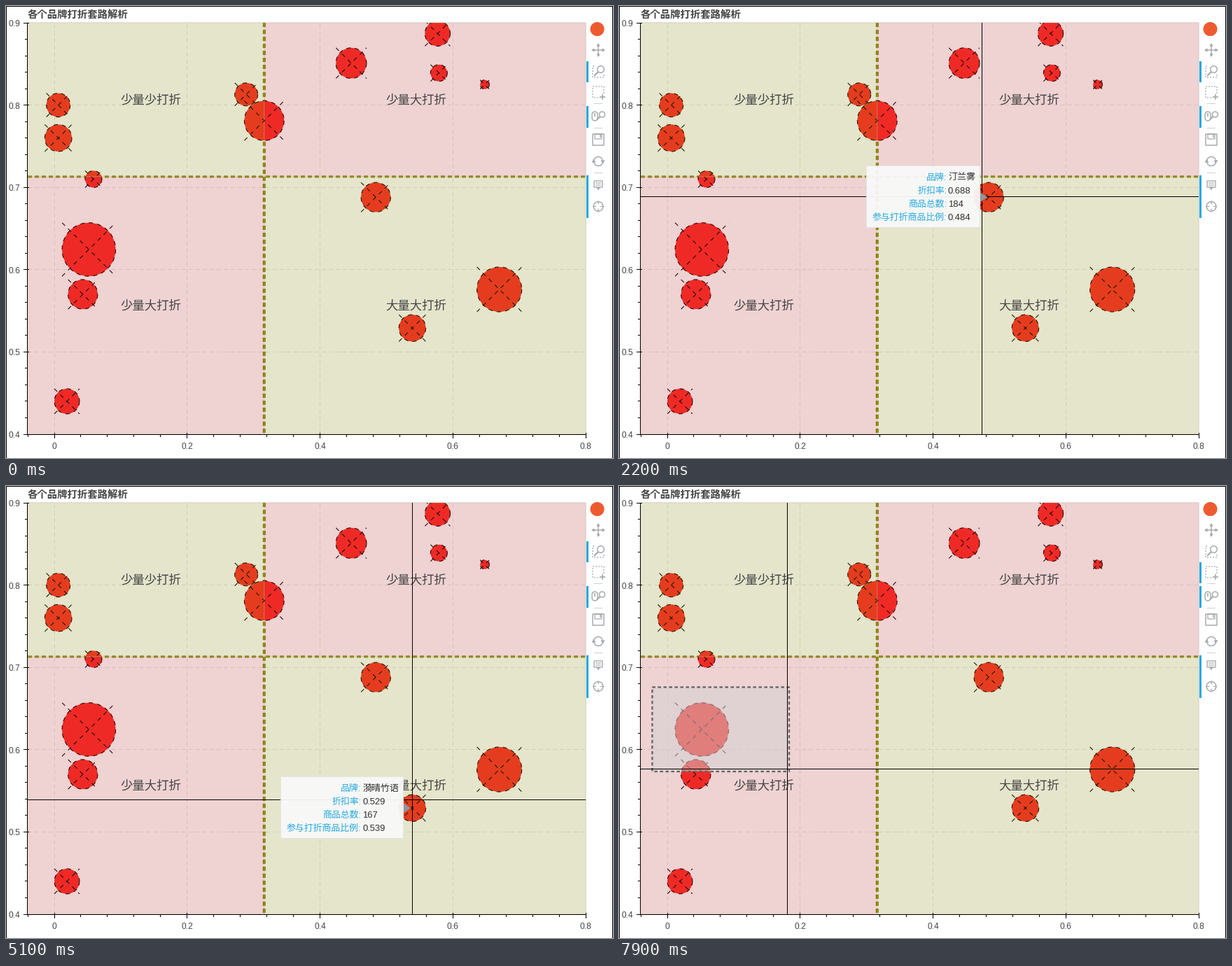
A matplotlib script that plays this animation: 867x646 px, repeating every 8000 ms.

```python
import numpy as np
import matplotlib.pyplot as plt
from matplotlib.animation import FuncAnimation
from matplotlib.patches import Circle, Polygon, Rectangle, RegularPolygon

plt.rcParams["path.snap"] = False

W, H = 867, 646
PT = 0.72  # points per pixel at 100 dpi
LEFT, TOP, RIGHT, BOTTOM = 31, 24, 828, 612
SPLIT_X, SPLIT_Y = 0.316, 0.713
BLUE, ICON, INK = "#26aae1", "#a1a6a9", "#444444"
SANS = ["Liberation Sans", "Noto Sans CJK JP"]
CJK = ["Noto Sans CJK JP"]

# share of goods on sale, discount rate, number of goods
BRANDS = [
    (0.006, 0.800, 148), (0.006, 0.760, 168), (0.059, 0.710, 104),
    (0.052, 0.6245, 333), (0.043, 0.570, 184), (0.019, 0.440, 156),
    (0.289, 0.813, 143), (0.316, 0.781, 247), (0.447, 0.851, 190),
    (0.577, 0.887, 157), (0.579, 0.839, 104), (0.648, 0.825, 57),
    (0.484, 0.688, 184), (0.670, 0.576, 279), (0.539, 0.529, 167),
]
NAMES = {3: "露芷坊", 12: "汀兰雾", 13: "禾露笺", 14: "漪晴竹语"}

# pointer moves: first frame, last frame, where it ends
ENTRY = (RIGHT, 372)
MOVES = [
    (0, 8, (165, 313)), (10, 17, (492, 259)), (19, 24, (532, 279)),
    (27, 33, (700, 391)), (36, 42, (570, 461)), (50, 58, (812, 150)),
    (66, 75, (47, 287)), (75, 79, (240, 404)),
]
LEAVE, SELECT, ENTER, DRAG = 59, 65, 67, 76


def sx(v):
    return 69 + 948.75 * v


def sy(v):
    return TOP + 1176 * (0.9 - v)


def crisp(v):
    return np.floor(v) + 0.5


def radius(n):
    return 0.1148 * n


def pointer(n):
    pos = np.array(ENTRY, float)
    for first, last, goal in MOVES:
        t = np.clip((n - first) / (last - first), 0, 1)
        pos += (np.array(goal) - pos) * t * t * (3 - 2 * t)
    return crisp(pos + 0.5)


fig = plt.figure(figsize=(8.67, 6.46), dpi=100, facecolor="white")
ax = fig.add_axes([0, 0, 1, 1])
ax.set_xlim(0, W)
ax.set_ylim(H, 0)
ax.axis("off")


def line(xs, ys, color, w=1, dash=None, z=1, **kw):
    style = "-" if dash is None else (0, [d / w for d in dash])
    return ax.plot(xs, ys, color=color, lw=w * PT, ls=style, zorder=z,
                   solid_capstyle="butt", dash_capstyle="butt", **kw)[0]


def hline(y, x0, x1, color, w=1, **kw):
    return line([x0, x1], [y, y], color, w, **kw)


def vline(x, y0, y1, color, w=1, **kw):
    return line([x, x], [y0, y1], color, w, **kw)


def outline(x0, y0, x1, y1, color, w=1, **kw):
    return line([x0, x1, x1, x0, x0], [y0, y0, y1, y1, y0], color, w, **kw)


def rect(x0, y0, x1, y1, color, z=1, edge="none", **kw):
    return ax.add_patch(Rectangle((x0, y0), x1 - x0, y1 - y0, fc=color,
                                  ec=edge, lw=PT, zorder=z, **kw))


def text(x, mid, s, size, color=INK, ha="left", z=5, family=SANS, **kw):
    return ax.text(x, mid + 0.37 * size, s, fontsize=size * PT, color=color,
                   ha=ha, va="baseline", family=family, zorder=z, **kw)


def arc(cx, cy, r, a0=0, a1=360, color=ICON, w=1.4, **kw):
    t = np.radians(np.linspace(a0, a1, 90))
    return line(cx + r * np.cos(t), cy + r * np.sin(t), color, w, **kw)


def triangle(cx, cy, r, turn):
    ax.add_patch(RegularPolygon((cx, cy), 3, radius=r, fc=ICON, ec="none",
                                orientation=np.radians(turn)))


def draw_axes():
    for v in np.arange(0, 0.7, 0.2):
        vline(crisp(sx(v)), BOTTOM, TOP, "#e5e5e5", dash=(6, 4))
    for v in np.arange(0.5, 0.85, 0.1):
        hline(crisp(sy(v)), LEFT, RIGHT, "#e5e5e5", dash=(6, 4))
    for i in range(26):
        v, major = 0.4 + 0.02 * i, i % 5 == 0
        hline(crisp(sy(v)), LEFT - (6 if major else 4),
              LEFT + (2 if major else 0), "black", z=6)
        if major:
            text(20, sy(v) + 0.5, f"{v:.1f}", 12, ha="right")
    for i in range(-1, 21):
        v, major = 0.04 * i, i % 5 == 0
        vline(crisp(sx(v)), BOTTOM - (2 if major else 0),
              BOTTOM + (6 if major else 4), "black", z=6)
        if major:
            text(sx(v), 628.5, f"{v:g}", 12, ha="center")
    hline(TOP - 0.5, LEFT, RIGHT, "#e0e0e0", z=5)
    vline(RIGHT + 0.5, TOP, BOTTOM, "#e0e0e0", z=5)
    vline(LEFT - 0.5, TOP, BOTTOM, "black", z=6)
    hline(BOTTOM + 0.5, LEFT, RIGHT, "black", z=6)
    hline(0.5, 0, W, "black")
    for x in (0.5, W - 0.5):
        vline(x, 0, H, "black")
    text(LEFT, 12.3, "各个品牌打折套路解析", 14.4, family=CJK, weight="bold")


def draw_bubbles():
    area = Rectangle((LEFT, TOP), RIGHT - LEFT, BOTTOM - TOP,
                     transform=ax.transData)
    for x, y, n in BRANDS:
        cx, cy, r = sx(x), sy(y), radius(n)
        disc = Circle((cx, cy), r, fc="#ff2c27", ec="none", zorder=3)
        parts = [ax.add_patch(disc),
                 arc(cx, cy, r, color="black", w=1.1, dash=(6, 6), z=3)]
        for s in (1, -1):
            parts.append(line([cx - r, cx + r], [cy + s * r, cy - s * r],
                              "black", 1.1, dash=(6, 6), z=3))
        for p in parts:
            p.set_clip_path(area)


def draw_quadrants():
    mx, my = sx(SPLIT_X), sy(SPLIT_Y)
    vline(mx, TOP, BOTTOM, "#808000", 4, dash=(6, 4), z=2)
    hline(my, LEFT, RIGHT, "#808000", 3, dash=(6, 4), z=2)
    for i, (x0, x1) in enumerate([(LEFT, mx), (mx, RIGHT)]):
        for j, (y0, y1) in enumerate([(TOP, my), (my, BOTTOM)]):
            tint = "olive" if i == j else "firebrick"
            rect(x0, y0, x1, y1, tint, z=4, alpha=0.2)
            outline(x0, y0, x1, y1, "#bdb678", z=4, alpha=0.3)
            share = "大量" if i and j else "少量"
            cut = "大打折" if i or j else "少打折"
            text(sx(0.1 + 0.4 * i) - 1, sy(0.8 - 0.25 * j) - 8.4,
                 share + cut, 17.4, family=CJK)


def lens(cx, cy, r, tail):
    arc(cx, cy, r)
    d = 0.7 * r
    line([cx - d, cx - d - tail], [cy + d, cy + d + tail], ICON, 2)


def draw_toolbar():
    cx = 846
    ax.add_patch(Circle((844.5, 33), 10, fc="#ee5a30", ec="none"))
    # pan
    hline(63, cx - 7, cx + 7, ICON, 1.4)
    vline(cx, 56, 70, ICON, 1.4)
    for k in range(4):
        a = k * np.pi / 2
        triangle(cx + 7 * np.cos(a), 63 + 7 * np.sin(a), 3, 90 * k - 90)
    # box zoom and box select
    for cy in (94, 123):
        outline(cx - 8, cy - 8, cx + 8, cy + 8, ICON, 1.2, dash=(2, 2))
    rect(842, 85, 856, 98, "white")
    lens(849.5, 90.5, 4.8, 6)
    rect(849, 126, 857, 134, "white")
    hline(130, 848, 856, ICON, 1.6)
    vline(852, 126, 134, ICON, 1.6)
    # wheel zoom
    arc(841, 155, 4, 180, 360)
    arc(841, 160, 4, 0, 180)
    for x in (837, 845):
        vline(x, 155, 160, ICON, 1.4)
    vline(841, 153, 158, ICON, 1.6)
    lens(851.5, 155, 4, 4.5)
    # save
    outline(cx - 8, 183, cx + 8, 199, ICON, 1.4)
    outline(cx - 5, 183, cx + 5, 190, ICON, 1.2)
    vline(849, 184, 188, ICON, 1.6)
    # reset
    for s in (0, 180):
        arc(cx, 222, 6.5, 190 + s, 340 + s)
        triangle(cx + 6.5 * np.cos(np.radians(s)), 222, 3.4, s)
    # hover
    outline(cx - 6, 250, cx + 6, 259, ICON, 1.3)
    triangle(cx, 260.5, 3, 0)
    for y in (253, 256):
        hline(y, cx - 4, cx + 4, ICON, 1.1)
    # crosshair
    arc(cx, 286.5, 6.8)
    for s in (-1, 1):
        hline(286.5, cx + 3 * s, cx + 8 * s, ICON, 1.2)
        vline(cx, 286.5 + 3 * s, 286.5 + 8 * s, ICON, 1.2)
    for y in (139.5, 174.5, 238.5):
        hline(y, cx - 6, cx + 6, "#d0d0d0")
    rect(829, 143, 832, 174, BLUE)
    rect(829, 242, 832, 303, BLUE)


class HoverTip:
    LABELS = ("品牌:", "折扣率:", "商品总数:", "参与打折商品比例:")

    def __init__(self):
        self.box = rect(0, 0, 1, 88, "#f9f9f9", z=10, edge="#e5e5e5",
                        alpha=0.95)
        self.arrow = ax.add_patch(Polygon([(0, 0), (1, 0), (0, 1)],
                                          fc="#909599", ec="none", zorder=11))
        self.labels = [text(0, 0, s, 12.9, BLUE, "right", 11)
                       for s in self.LABELS]
        self.values = [text(0, 0, "", 13, "#2f2f2f", z=11)
                       for _ in self.LABELS]

    def show(self, i):
        for p in (self.box, self.arrow, *self.labels, *self.values):
            p.set_visible(i is not None)
        if i is None:
            return
        x, y, n = BRANDS[i]
        cx, cy = sx(x), sy(y)
        side = 1 if cx < (LEFT + RIGHT) / 2 else -1
        width = 124 + 13 * len(NAMES[i])
        edge = round(cx + 12 * side)
        x0 = edge if side > 0 else edge - width
        y0 = round(cy) - 45
        self.box.set_bounds(x0 + 0.5, y0 + 0.5, width - 1, 88)
        self.arrow.set_xy([(edge, cy - 7), (edge - 10 * side, cy),
                           (edge, cy + 7)])
        rows = (NAMES[i], f"{y:.3f}", str(n), f"{x:.3f}")
        for k, s in enumerate(rows):
            base = y0 + 21 + 19 * k
            self.labels[k].set_position((x0 + 115.5, base))
            self.values[k].set_position((x0 + 117, base))
            self.values[k].set_text(s)


def hit(px, py):
    for i in NAMES:
        x, y, n = BRANDS[i]
        if np.hypot(px - sx(x), py - sy(y)) <= radius(n):
            return i
    return None


draw_axes()
draw_bubbles()
draw_quadrants()
draw_toolbar()

mode_bar = rect(829, 79, 832, 109, BLUE, z=14)
button_tip = [rect(736.5, 108.5, 829.5, 138.5, "white", z=12, edge="#e5e5e5"),
              text(782, 123, "Box Select", 14.2, "#222222", "center", 13)]
sel_fill = rect(0, 0, 1, 1, "lightgrey", z=7, alpha=0.5)
sel_edge = line([], [], "#666666", 2.4, dash=(4.5, 3.5), z=7)
cross_v = line([], [], "black", z=8)
cross_h = line([], [], "black", z=8)
tip = HoverTip()


def update(n):
    inside = 1 <= n < LEAVE or n >= ENTER
    px, py = pointer(n)
    cross_v.set_data([px, px], [TOP, BOTTOM])
    cross_h.set_data([LEFT, RIGHT], [py, py])
    cross_v.set_visible(inside)
    cross_h.set_visible(inside)
    tip.show(hit(px, py) if inside else None)

    mode_bar.set_y(79 if n < SELECT else 109)
    for p in button_tip:
        p.set_visible(LEAVE <= n < ENTER)

    x0, y0 = np.array(MOVES[-2][2]) + 0.5
    x1, y1 = px + 2.5, py + 3.5
    sel_fill.set_bounds(x0, y0, x1 - x0, y1 - y0)
    sel_edge.set_data([x0, x1, x1, x0, x0], [y0, y0, y1, y1, y0])
    sel_fill.set_visible(n >= DRAG)
    sel_edge.set_visible(n >= DRAG)
    return []


anim = FuncAnimation(fig, update, frames=80, interval=100, repeat=True,
                     repeat_delay=0, init_func=lambda: update(0), blit=False)
plt.show()
```
